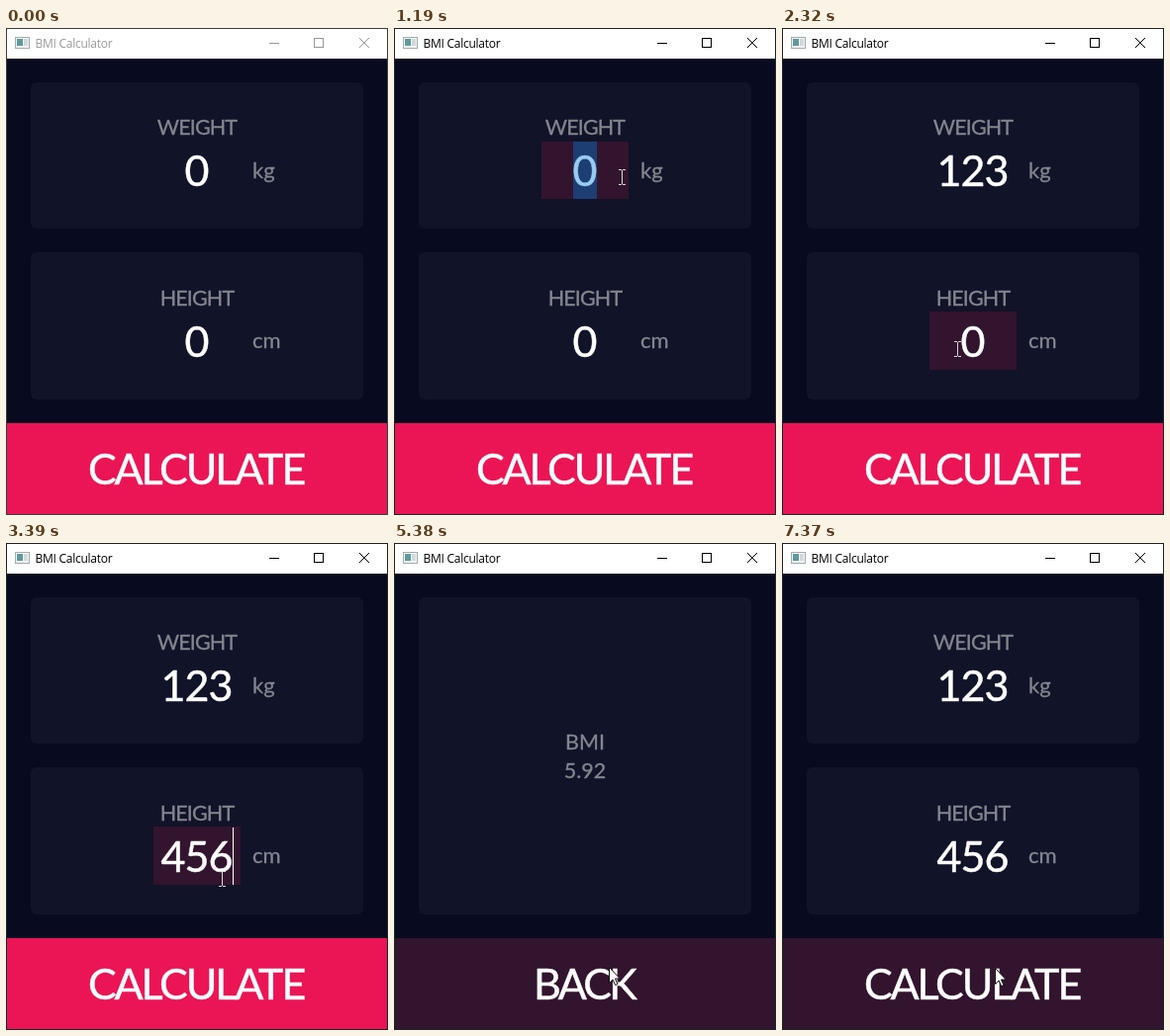
These frames come from a looping animation (386 by 493 pixels, 7440 ms). An HTML page:

```html
<!DOCTYPE html>
<html lang="en">
<head>
<meta charset="utf-8">
<title>BMI Calculator</title>
<style>
  html, body { margin: 0; width: 100%; height: 100%; overflow: hidden; background: #080a20; }
  svg { display: block; width: 386px; height: 493px; cursor: default; }
  text { font-family: Lato, sans-serif; text-anchor: middle; white-space: pre; }
  rect { shape-rendering: crispEdges; }
  .card { fill: #111328; shape-rendering: auto; }
  .label { font-size: 21.5px; fill: #84868f; stroke: #84868f; stroke-width: .3px; }
  .caps { letter-spacing: -.04em; }
  .unit { font-size: 22px; text-anchor: start; }
  .value, .action { font-size: 43px; fill: #fff; stroke: #fff; stroke-width: .5px; }
  .value { letter-spacing: -.022em; }
  .action { letter-spacing: -.049em; }
  .action.back { letter-spacing: -.063em; }
  .title { font: 12px "Open Sans", sans-serif; letter-spacing: -.022em; text-anchor: start; }
  .glow { fill: #33142e; }
  .mark { fill: #1c3e73; }
</style>
</head>
<body>
<svg viewBox="0 0 386 493" xmlns="http://www.w3.org/2000/svg">
  <rect id="frame" width="386" height="493"/>
  <rect x="1" y="1" width="384" height="30" fill="#fff"/>
  <rect x="1" y="31" width="384" height="461" fill="#080a20"/>

  <g>
    <rect x="9" y="9" width="15" height="12" fill="#a4abae"/>
    <rect x="10" y="10" width="13" height="10" fill="#f4f6f6"/>
    <rect x="11" y="11" width="6" height="7" fill="#5d9a9b"/>
    <rect x="18" y="11" width="4" height="7" fill="#d3dadb"/>
  </g>
  <text class="title" id="title" x="29.5" y="20">BMI Calculator</text>
  <g id="chrome" fill="none">
    <path d="M266 15.5h10M311.5 10.5h9v9h-9z" shape-rendering="crispEdges"/>
    <path d="M357 10l10 10M367 10l-10 10"/>
  </g>

  <g id="form">
    <rect class="card" x="25" y="55" width="336" height="148" rx="6"/>
    <rect class="card" x="25" y="227" width="336" height="149" rx="6"/>
    <text class="label caps" x="193" y="108">WEIGHT</text>
    <text class="label caps" x="193" y="281">HEIGHT</text>
    <text class="label unit" x="249" y="152">kg</text>
    <text class="label unit" x="249" y="324">cm</text>
    <rect class="glow" id="glow" x="149" width="88"/>
    <rect class="mark" id="mark" x="181" width="24"/>
    <text class="value" id="weight" x="192.5" y="160"></text>
    <text class="value" id="height" x="192.5" y="333"></text>
    <rect id="caret" width="1" fill="#fff"/>
  </g>

  <g id="result">
    <rect class="card" x="25" y="55" width="336" height="321" rx="6"/>
    <text class="label" x="193" y="209">BMI</text>
    <text class="label" x="193" y="238">5.92</text>
  </g>

  <rect id="button" x="1" y="400" width="384" height="92"/>
  <text class="action" id="action" x="192" y="462"></text>

  <g id="pointer">
    <circle id="click" cx="-.5" cy="-.5" r="11.5" fill="#d8d000" opacity=".7"/>
    <path id="arrow" d="M-.5 -.5V15.5L3.2 12L5.7 17.6L8 16.6L5.5 11H10.3Z" fill="#fff" stroke="#111" stroke-width="1"/>
    <path id="beam" d="M-3 -7.5H0M1 -7.5H4M.5 -7V7M-3 7.5H0M1 7.5H4" fill="none" stroke="#d8d8d8" shape-rendering="crispEdges"/>
  </g>
</svg>
<script>
const LOOP = 7440, TICK = 65;
const $ = id => document.getElementById(id);
const show = (id, on) => { $(id).style.display = on ? '' : 'none'; };
const set = (id, attrs) => { for (const k in attrs) $(id).setAttribute(k, attrs[k]); };

const fields = { weight: { y: 115, h: 58 }, height: { y: 287, h: 59 } };

// Each row changes part of the state from its time on.
const script = [
  [0, { weight: '0', height: '0', page: 'form' }],
  [730, { click: true }],
  [790, { active: true, focus: 'weight' }],
  [860, { click: false }],
  [925, { click: true, marked: true }],
  [990, { click: false }],
  [1320, { weight: '1', marked: false, caret: true }],
  [1450, { weight: '12' }],
  [1580, { weight: '123' }],
  [2255, { focus: 'height', caret: false, click: true }],
  [2320, { click: false }],
  [2390, { click: true, marked: true }],
  [2460, { click: false }],
  [2920, { height: '4', marked: false, caret: true }],
  [2990, { height: '45' }],
  [3060, { height: '456' }],
  [4190, { click: true, focus: null, caret: false }],
  [5320, { click: false, page: 'result' }],
  [6780, { click: true }],
  [7370, { click: false, page: 'form' }]
];

// Pointer moves: start time, number of ticks, x, y.
const moves = [
  [70, 1, 350, 196],
  [135, 7, 230, 151],
  [1790, 3, 218, 185],
  [1990, 5, 177, 325],
  [3260, 3, 218, 340],
  [3455, 8, 218, 454],
  [5320, 5, 218, 335],
  [5980, 5, 218, 401],
  [6305, 2, 216, 431]
];

function stateAt(t) {
  const s = {};
  for (const [time, change] of script) if (t >= time) Object.assign(s, change);
  return s;
}

function pointerAt(t) {
  let [, , x, y] = moves[0];
  for (const [start, ticks, tx, ty] of moves) {
    if (t < start) break;
    const p = Math.min(1, (Math.floor((t - start) / TICK) + 1) / ticks);
    x += (tx - x) * p;
    y += (ty - y) * p;
  }
  return { x: Math.round(x), y: Math.round(y) };
}

function draw(t) {
  const s = stateAt(t), { x, y } = pointerAt(t);
  const form = s.page === 'form';
  const ink = s.active ? '#000' : '#999';

  set('frame', { fill: s.active ? '#202124' : '#3a3b3d' });
  set('title', { fill: ink });
  set('chrome', { stroke: ink });

  show('form', form);
  show('result', !form);
  for (const id in fields) {
    const { style } = $(id);
    $(id).textContent = s[id];
    style.fill = style.stroke = s.marked && s.focus === id ? '#99caf0' : '#fff';
  }

  const f = fields[s.focus];
  show('glow', f);
  show('mark', f && s.marked);
  show('caret', f && s.caret);
  if (f) {
    set('glow', { y: f.y, height: f.h });
    set('mark', { y: f.y, height: f.h });
    set('caret', { x: Math.round(193 + s[s.focus].length * 12.1), y: f.y + 1, height: f.h - 1 });
  }

  const hover = t >= 70 && y >= 402;
  set('button', { fill: hover ? '#33142e' : '#eb1555' });
  $('action').textContent = form ? 'CALCULATE' : 'BACK';
  $('action').classList.toggle('back', !form);

  const typing = form && x >= 149 && x < 237 &&
    Object.values(fields).some(b => y >= b.y && y < b.y + b.h);
  show('pointer', t >= 70);
  set('pointer', { transform: `translate(${x} ${y})` });
  show('click', s.click);
  show('arrow', !typing);
  show('beam', typing);
}

const begin = performance.now();
function tick() {
  draw((performance.now() - begin) % LOOP);
  requestAnimationFrame(tick);
}
tick();
</script>
</body>
</html>
```
